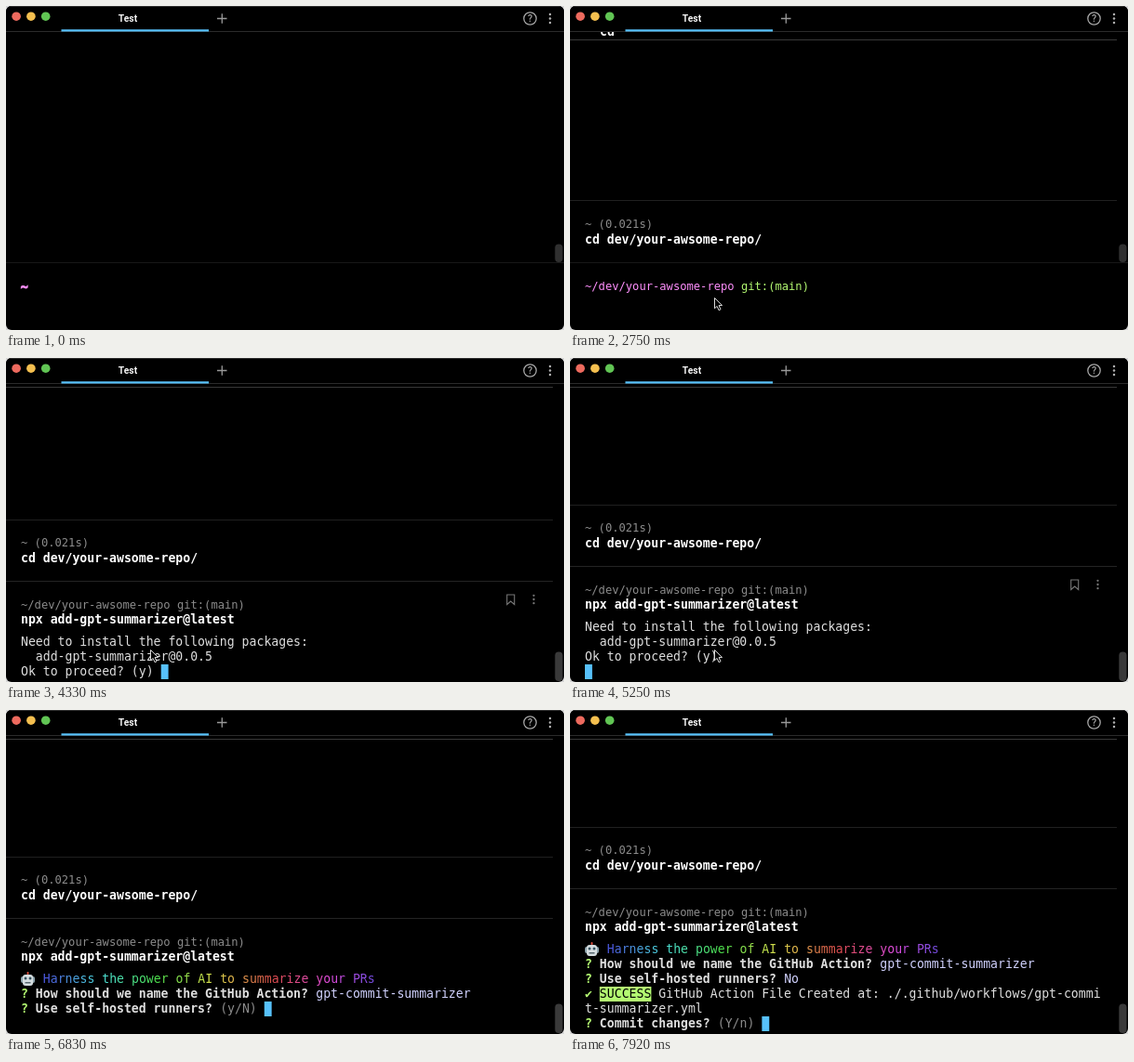
Write an HTML page with a canvas that moves like this. It is 600 by 349 pixels and loops after 8 s.

```html
<!DOCTYPE html>
<html lang="en">
<head>
<meta charset="utf-8">
<title>Terminal session</title>
<style>
html, body { margin: 0; width: 100%; height: 100%; overflow: hidden; background: #000; }
canvas { display: block; width: 600px; height: 349px; }
</style>
</head>
<body>
<canvas id="stage" width="600" height="349"></canvas>
<script>
const ctx = document.getElementById('stage').getContext('2d');
const LOOP = 8000, COL = 7.932, ROW = 16, LEFT = 16;
const MONO = '"DejaVu Sans Mono", monospace';
const BODY = `13.17px ${MONO}`, BOLD = `bold ${BODY}`, SMALL = `12.13px ${MONO}`;
const PINK = '#ff8ffd', GREEN = '#b4fa72', LAVENDER = '#d0d1fe', BLUE = '#57c1fb';
const WHITE = '#fff', TEXT = '#dedede', GRAY = '#8c8c8c';
const CD = 'cd dev/your-awsome-repo/';
const NPX = 'npx add-gpt-summarizer@latest';
const TITLE = 'Harness the power of AI to summarize your PRs';

// Moments of the session, in ms
const T = {
  mouse: 1500, type1: 2330, enter1: 2650, type2: 2830, run: 3650, ask: 4250,
  accept: 4900, clear: 5420, title: 5750, hueStart: 5800, name: 6520,
  runners: 6750, answered: 7150, success: 7400, commit: 7550
};

function text(str, x, y, color, font) {
  ctx.font = font;
  ctx.fillStyle = color;
  ctx.fillText(str, x, y);
}

function rect(x, y, w, h, color, radius = 0) {
  ctx.fillStyle = color;
  ctx.beginPath();
  ctx.roundRect(x, y, w, h, radius);
  ctx.fill();
}

function dot(x, y, r, color) {
  ctx.fillStyle = color;
  ctx.beginPath();
  ctx.arc(x, y, r, 0, Math.PI * 2);
  ctx.fill();
}

function stroke(points, color, width = 1) {
  ctx.strokeStyle = color;
  ctx.lineWidth = width;
  ctx.beginPath();
  points.forEach(([x, y]) => ctx.lineTo(x, y));
  ctx.stroke();
}

const typed = (str, t, from, to) =>
  str.slice(0, Math.max(0, Math.ceil(str.length * Math.min(1, (t - from) / (to - from)))));

function moreDots(x, y, gap, r, color) {
  for (let i = -1; i <= 1; i++) dot(x, y + i * gap, r, color);
}

function titleBar() {
  rect(0, 0, 600, 27, '#000');
  rect(0, 27, 600, 1, '#2b2b2b');
  rect(59.5, 25.3, 158.5, 2.1, BLUE);
  ['#ed6a5e', '#f4bf4f', '#61c554'].forEach((c, i) => dot(11.1 + i * 15.8, 11.2, 4.8, c));
  ctx.textAlign = 'center';
  text('Test', 131, 17, '#f4f4f4', 'bold 10.3px Roboto, sans-serif');
  text('?', 563.5, 17.4, '#a6a6a6', '500 10.5px Roboto, sans-serif');
  ctx.textAlign = 'left';
  stroke([[227, 13.5], [237.5, 13.5]], '#999', 1.3);
  stroke([[232.3, 8.3], [232.3, 18.7]], '#999', 1.3);
  ctx.lineWidth = 1.3;
  ctx.strokeStyle = '#a6a6a6';
  ctx.beginPath();
  ctx.arc(563.5, 13.5, 6.7, 0, Math.PI * 2);
  ctx.stroke();
  moreDots(585, 13.5, 4.4, 1.25, '#b0b0b0');
}

function robot(x, y) {
  rect(x, y - 3, 15, 7, '#8fa5ae', 2);
  rect(x + 2, y - 5, 11, 12, '#d5dde0', 3);
  rect(x + 6.5, y - 8, 2, 3, '#e0503f', 1);
  dot(x + 5, y - 1, 1.5, '#35505c');
  dot(x + 10, y - 1, 1.5, '#35505c');
  rect(x + 4.5, y + 3, 6, 1.6, '#56666e');
}

function rainbow(t, y) {
  const hue = Math.max(0, Math.min(t, T.name) - T.hueStart) / 2.88;
  const span = TITLE.length + 2;
  robot(LEFT, y);
  [...TITLE].forEach((ch, i) => {
    const h = ((hue - 360 * (i + 2) / span) % 360 + 360) % 360;
    text(ch, LEFT + (i + 3) * COL, y + 4, `hsl(${h},68%,58%)`, BODY);
  });
}

// Each part is [string, color, font, background]; returns the next column.
function line(y, parts) {
  let col = 0;
  for (const [str, color, font = BODY, back] of parts) {
    const x = LEFT + col * COL;
    if (back) rect(x, y - 8, str.length * COL, 16, back);
    text(str, x, y + 4, color, font);
    col += str.length;
  }
  return col;
}

const question = (label, rest, color) =>
  [['? ', GREEN, BOLD], [label + ' ', TEXT, BOLD], [rest, color]];

function outputLines(t) {
  if (t < T.ask) return [[]];
  if (t < T.clear) {
    const rows = [
      [['Need to install the following packages:', TEXT]],
      [['  add-gpt-summarizer@0.0.5', TEXT]],
      [['Ok to proceed? (y) ', TEXT]]
    ];
    if (t >= T.accept) rows.push([]);
    return rows;
  }
  if (t < T.title) return [[]];
  const rows = ['rainbow'];
  const ask = 'How should we name the GitHub Action?';
  const host = 'Use self-hosted runners?';
  if (t < T.name) return [...rows, []];
  if (t < T.runners) return [...rows, question(ask, '(gpt-commit-summarizer) ', GRAY)];
  rows.push(question(ask, 'gpt-commit-summarizer', LAVENDER));
  if (t < T.answered) return [...rows, question(host, '(y/N) ', GRAY)];
  rows.push(question(host, 'No', LAVENDER));
  if (t < T.success) return [...rows, []];
  rows.push(
    [['✔ ', GREEN], ['SUCCESS', '#000', BODY, GREEN],
     [' GitHub Action File Created at: ./.github/workflows/gpt-commi', TEXT]],
    [['t-summarizer.yml', TEXT]]
  );
  rows.push(t < T.commit ? [] : question('Commit changes?', '(Y/n) ', GRAY));
  return rows;
}

function scrollOffset(t) {
  if (t < T.ask) return 0;
  if (t < T.accept) return 36;
  return t < T.success ? 52 : 84;
}

function blockIcons(y) {
  stroke([[538.7, y - 5], [546.7, y - 5], [546.7, y + 5.5], [542.7, y + 2],
    [538.7, y + 5.5], [538.7, y - 5.5]], '#777', 1.1);
  moreDots(567.5, y, 4.2, 1.15, '#777');
}

function prompt(t) {
  const inRepo = t >= T.enter1;
  if (inRepo) {
    const path = '~/dev/your-awsome-repo ';
    text(path, LEFT, 305.5, PINK, SMALL);
    text('git:(main)', LEFT + path.length * 7.303, 305.5, GREEN, SMALL);
  } else {
    text('~', LEFT - 0.2, 306.5, PINK, `bold 13.17px ${MONO}`);
    ctx.lineWidth = 0.9;
    ctx.strokeStyle = PINK;
    ctx.strokeText('~', LEFT - 0.2, 306.5);
  }
  const input = inRepo ? typed(NPX, t, T.type2, T.run - 70) : typed(CD, t, T.type1, T.enter1 - 50);
  text(input, LEFT, 322, WHITE, BODY);
}

function runningBlock(t, s) {
  text('~/dev/your-awsome-repo git:(main)', LEFT, 305.5 - s, GRAY, SMALL);
  text(NPX, LEFT, 322 - s, WHITE, BOLD);
  if (t < 6250) blockIcons(296 - s);
  const rows = outputLines(t);
  let col = 0, y = 0;
  rows.forEach((row, i) => {
    y = 342 - s + i * ROW;
    if (row === 'rainbow') rainbow(t, y);
    else col = line(y, row);
  });
  rect(LEFT + col * COL, y - 8, 7.9, 16, BLUE);
}

function pointer(t) {
  if (t < T.mouse || t >= T.clear) return;
  const ease = (a, b) => {
    const p = Math.max(0, Math.min(1, (t - a) / (b - a)));
    return p * p * (3 - 2 * p);
  };
  const a = ease(T.mouse, 1830), b = ease(1830, 2170);
  ctx.save();
  ctx.translate(205 - 42 * a - 8 * b, 290 + 13 * a + 11 * b);
  ctx.beginPath();
  [[0.5, 0.5], [0.5, 11.8], [3.1, 9.4], [5, 13.7], [7, 12.8], [5.1, 8.6], [8.6, 8.4]]
    .forEach(([x, y]) => ctx.lineTo(x, y));
  ctx.closePath();
  ctx.fillStyle = '#000';
  ctx.strokeStyle = '#dcdcdc';
  ctx.lineWidth = 1;
  ctx.fill();
  ctx.stroke();
  ctx.restore();
}

function draw(t) {
  ctx.fillStyle = '#d4d4d4';
  ctx.fillRect(0, 0, 600, 349);
  ctx.save();
  ctx.beginPath();
  ctx.roundRect(0, 0, 600, 349, 6);
  ctx.clip();
  ctx.fillStyle = '#000';
  ctx.fillRect(0, 0, 600, 349);

  const running = t >= T.run, s = scrollOffset(t);
  rect(0, 276 - s, running ? 588 : 600, 1, running ? '#242424' : '#181818');
  if (t >= T.enter1) {
    const top = s ? 31 : 36;
    text('cd', 32, top - 4, WHITE, BOLD);
    rect(0, top, 588, 1, '#383838');
    rect(0, (s ? 210 : 209) - s, 588, 1, '#202020');
    text('~ (0.021s)', LEFT, 239 - s, GRAY, SMALL);
    text(CD, LEFT, 255.5 - s, WHITE, BOLD);
  }
  if (running) runningBlock(t, s);
  else prompt(t);
  if (running) rect(590.3, 316.5, 8.2, 31.5, '#3a3a3a', 4);
  else rect(590.3, 256.5, 8.2, 19.5, '#303030', 4);

  titleBar();
  pointer(t);
  rect(0, 0, 600, 1, '#2c2c2c');
  ctx.restore();
}

const start = performance.now();
function tick() {
  draw((performance.now() - start) % LOOP);
  requestAnimationFrame(tick);
}
tick();
</script>
</body>
</html>
```
